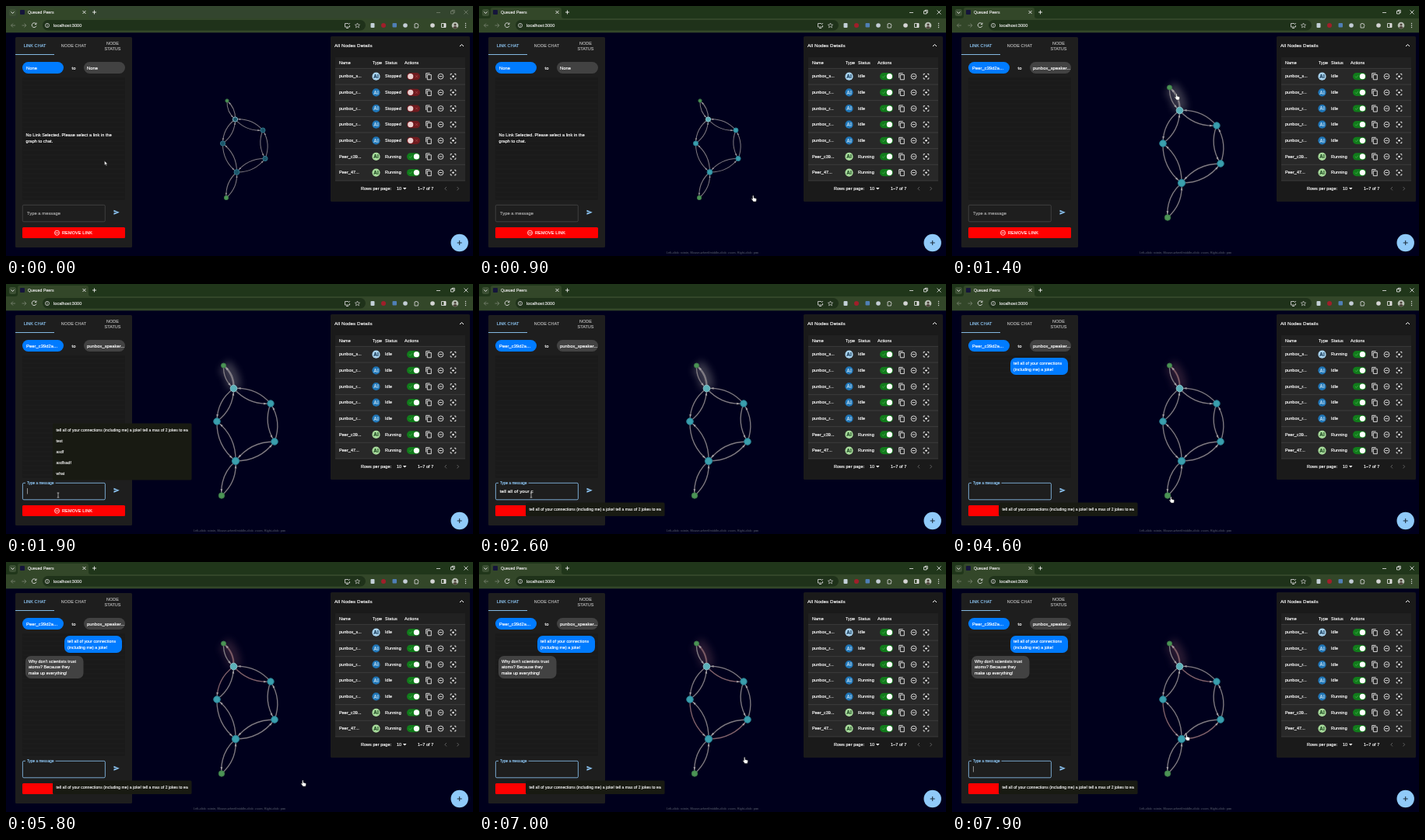
Write an HTML page that moves like this. It is 600x322 px and loops after 8 s.

```html
<!DOCTYPE html>
<html lang="en">
<head>
<meta charset="utf-8">
<title>Agent graph</title>
<style>
html, body { margin: 0; width: 100%; height: 100%; overflow: hidden; background: #00001c; }
svg { display: block; }
text { font-family: "Liberation Sans", Arial, sans-serif; letter-spacing: .06px; white-space: pre; stroke-width: .16px; }
</style>
</head>
<body>
<svg id="stage" width="600" height="322" viewBox="0 0 600 322">
  <defs>
    <filter id="blur" x="-300%" y="-100%" width="700%" height="300%"><feGaussianBlur stdDeviation="5"/></filter>
  </defs>
  <g id="base"></g>
  <g id="live"></g>
</svg>
<script>
const LOOP = 8000, SKY = '#90caf9', BAR = '#334729';
const MESSAGE = 'tell all of your connections (including me) a joke!';
const HISTORY = [MESSAGE + ' tell a max of 2 jokes to each', 'test', 'asdf', 'asdfsadf', 'what'];
const NAMES = ['punbox_s...', 'punbox_r...', 'punbox_r...', 'punbox_r...', 'punbox_r...', 'Peer_c39...', 'Peer_47...'];
const T = { active: 200, on: 500, zoom: 1000, pick: 1400, focus: 1850, type: 1960, send: 3950, run: 4150, reply: 5400, spread: 6800 };

const rect = (x, y, w, h, fill, r = 0, extra = '') =>
  `<rect x="${x}" y="${y}" width="${w}" height="${h}" rx="${r}" fill="${fill}" ${extra}/>`;
const dot = (x, y, r, fill, extra = '') => `<circle cx="${x}" cy="${y}" r="${r}" fill="${fill}" ${extra}/>`;
const line = (d, color = '#eee', w = .9, extra = '') =>
  `<path d="${d}" fill="none" stroke="${color}" stroke-width="${w}" ${extra}/>`;
const shape = (d, fill, extra = '') => `<path d="${d}" fill="${fill}" ${extra}/>`;
const text = (x, y, s, size = 5.47, fill = '#fff', anchor = 'start', extra = '') =>
  `<text x="${x}" y="${y}" font-size="${size}" fill="${fill}" stroke="${fill}" text-anchor="${anchor}" ${extra}>${s}</text>`;
const at = (x, y, s) => `<g transform="translate(${x} ${y})">${s}</g>`;
const clamp = v => Math.max(0, Math.min(1, v));
const ease = v => v * v * (3 - 2 * v);
const mix = (a, b, k) => a + (b - a) * k;
const minusIcon = (x, y, r) => dot(x, y, r, 'none', 'stroke="#fff" stroke-width=".8"') + line(`M${x - 2} ${y}h4`);

const pen = document.createElement('canvas').getContext('2d');
pen.font = '62.5px "Liberation Sans", Arial, sans-serif';
const textWidth = s => pen.measureText(s).width / 10 + s.length * .06;

// The title bar is paler while the window is inactive.
function titleBar(t) {
  const active = t >= T.active;
  return rect(0, 0, 600, 16, active ? '#20361a' : '#33452e') + rect(4, 4, 9, 9, '#3c5034', 2.5) + line('M6.5 7.5l2 2 2-2') +
    shape('M12 16q3 0 3-3V5q0-3 3-3h85q3 0 3 3v8q0 3 3 3z', BAR) + rect(18, 5, 6, 6, '#15153a', 1) +
    text(28, 10, 'Queued Peers', 5.1, '#e6e6e6') + line('M98.5 6l4 4m0-4l-4 4M111 8h5m-2.5-2.5v5') +
    line('M553 8.5h5M571.5 6.5h3.5v3.5h-3.5zM573 6.5v-1.2h3.3v3.5h-1.2M588.5 5.5l5 5m0-5l-5 5', active ? '#eee' : '#76826f', .8);
}

function toolbar() {
  return rect(0, 15.5, 600, 18.8, BAR) + rect(47, 18, 415, 13.5, '#1f321a', 6.7) +
    line('M12 25H6.5m2.5-2.5L6.5 25 9 27.5M20.5 25H26m-2.5-2.5L26 25l-2.5 2.5', '#74806c') +
    line('M38.5 23a2.9 2.9 0 1 0 .4 2.5M39 21.5v2h-2', '#ddd') +
    dot(53, 25, 2.6, 'none', 'stroke="#ccc" stroke-width=".8"') + line('M53 24.7v1.8m0-3.2v.7', '#ccc') +
    text(61, 27, 'localhost:3000', 5.5, '#eee') +
    line('M440 22.5h-4.5v4.5h6v-2M437 28.5h3M440 24l2-2', '#ccc') +
    line('M451.5 22l.9 2 2.2.2-1.7 1.4.6 2.2-2-1.2-2 1.2.6-2.2-1.7-1.4 2.2-.2z', '#ccc', .7) +
    rect(468.5, 22, 5, 6, '#c3d0d8', 1) + dot(485, 25, 3, '#a01f2a') + rect(496.5, 22, 5.5, 5.5, '#4f7fb5', 1) +
    dot(513, 25, 2.8, '#c4cdd6') + line('M525 23h1.3q.7-2 1.5 0h1.5v1.5q2 .7 0 1.5V28H525z', '#ccc') +
    dot(548, 25, 2.8, '#d5d5d5') + line('M559.5 22.5h5.5v5h-5.5z', '#ddd') + rect(562.5, 22.5, 2.5, 5, '#ddd') +
    dot(577, 25, 4.3, '#b9c0b5') + dot(577, 24, 1.5, '#4b4038') + shape('M574 28q3-4 6 0-3 2-6 0z', '#4b4038') +
    [22.5, 25, 27.5].map(y => dot(590.5, y, .7, '#ddd')).join('');
}

function chatPanel() {
  let ruled = '';
  for (let y = 96; y < 250; y += 6) ruled += line(`M21.5 ${y}h131`, '#222', .7);
  return rect(12, 40, 150, 271, '#1e1e1e', 1.5) +
    text(37, 53, 'LINK CHAT', 5.47, SKY, 'middle') + text(87, 53, 'NODE CHAT', 5.47, '#b5b5b5', 'middle') +
    text(137, 49.5, 'NODE', 5.47, '#b5b5b5', 'middle') + text(137, 56.5, 'STATUS', 5.47, '#b5b5b5', 'middle') +
    rect(12, 62, 50, .9, SKY) + rect(21, 92, 132, 158, '#1a1a1a', 1) + ruled +
    rect(21, 72, 53, 15, '#007bff', 7.5) + rect(100, 72, 53, 15, '#424242', 7.5) +
    text(87, 81.5, 'to', 5.8, '#fff', 'middle') +
    shape('M138.5 262.8l7.3 3-7.3 3v-2.3l4.8-.7-4.8-.7z', SKY) +
    rect(21, 285, 132, 14, '#f00', 1.5) + minusIcon(65.5, 292.2, 3) +
    text(72, 294.2, 'REMOVE LINK', 5.47, '#fff', 'start', 'style="letter-spacing:.16px"');
}

const rowY = i => 90.7 + i * 20.65;

function nodesPanel() {
  let s = rect(417, 39, 179, 213, '#1a1a1a', 1.5) + text(422, 53.2, 'All Nodes Details', 6.25) +
    line('M583 52l2.5-2.5 2.5 2.5', '#fff', 1) + rect(423, 66, 167, 159, '#212121', 1) +
    rect(423, 80.4, 167, 144.6, '#282828');
  [[428, 'Name'], [471, 'Type'], [487, 'Status'], [512, 'Actions']].forEach(([x, label]) => s += text(x, 75, label));
  NAMES.forEach((name, i) => {
    const y = rowY(i), user = i > 4;
    s += line(`M423 ${y - 10.3}h167`, '#4a4a4a', .6) + text(428, y + 1.7, name) +
      dot(475.5, y, 5.1, user ? '#a8dc9c' : i ? '#1f76b8' : '#a9d3ee') +
      text(475.5, y + 2.2, 'AI', 6.3, user ? '#204a24' : i ? '#aacfe8' : '#173a58', 'middle', 'font-weight="700"') +
      at(543, y, line('M-1.7-2.2h5v6.3h-5zM-3.3 2v-6h5')) + minusIcon(558.5, y, 3.4) +
      at(574.5, y, line('M-3.3-1.5v-1.8h1.8M1.5-3.3h1.8v1.8M3.3 1.5v1.8H1.5M-1.5 3.3h-1.8V1.5') + dot(0, 0, 1.2, '#fff'));
  });
  return s + line('M423 225h167', '#4a4a4a', .6) + text(456, 237, 'Rows per page:') + text(502, 237, '10') +
    shape('M510 234h4.5l-2.25 2.5z', '#fff') + text(529, 237, '1–7 of 7') +
    line('M566 233l-2.2 2.2 2.2 2.2M579.5 233l2.2 2.2-2.2 2.2', '#666');
}

function status(i, t) {
  if (i > 4) return 'Running';
  if (t < T.on) return 'Stopped';
  const [from, to] = [[T.run, T.reply], [T.reply, T.spread], [T.reply, 7200], [6500, 7500], [T.spread, LOOP]][i];
  return t >= from && t < to ? 'Running' : 'Idle';
}

function toggles(t) {
  return NAMES.map((_, i) => {
    const y = rowY(i), state = status(i, t), off = state === 'Stopped';
    return text(487, y + 1.7, state) + rect(515, y - 4.6, 17, 9.2, off ? '#701a1e' : '#117c1b', 4.6) +
      (off ? line(`M526 ${y - 1.5}l3 3m0-3l-3 3`, '#b04a4e', .7) : line(`M518 ${y}l1.5 1.5 2.5-3`, '#4fb257', .7)) +
      dot(off ? 519.7 : 527.4, y, 3.6, off ? '#ecd0d0' : '#fff');
  }).join('');
}

// Each node: x, y before zooming, x, y after zooming, radius after zooming
const NODES = [[284, 122, 279.5, 105, 3.5], [294.5, 146, 292.5, 134.5, 4.8], [330, 160, 340, 154, 4.7],
  [333, 196.5, 345, 203, 4.8], [296.5, 214, 295, 228, 5.2], [278.5, 177, 271, 177, 4.8], [283, 247, 277, 272.5, 4.2]];
const LINKS = [[0, 1], [1, 2], [2, 3], [3, 4], [4, 5], [5, 1], [4, 6]];

function graph(t) {
  const k = ease(clamp((t - T.zoom) / 350)), scale = mix(.75, 1, k);
  const pts = NODES.map(n => [mix(n[0], n[2], k), mix(n[1], n[3], k), n[4] * scale]);
  const busy = t < T.run ? [] : t < T.reply ? ['1-0'] : t < T.spread ? ['1-0', '1-2', '1-5'] : ['1-0', '5-4', '4-3', '1-2'];
  let s = '';
  const arc = (a, b) => {
    const [x1, y1, r1] = pts[a], [x2, y2, r2] = pts[b], dx = x2 - x1, dy = y2 - y1;
    const cx = (x1 + x2) / 2 - dy * .25, cy = (y1 + y2) / 2 + dx * .25;
    const d = `M${x1} ${y1}Q${cx} ${cy} ${x2} ${y2}`;
    const u = 1 - (r2 + 2 * scale) / Math.hypot(dx, dy), v = 1 - u;
    const px = v * v * x1 + 2 * u * v * cx + u * u * x2, py = v * v * y1 + 2 * u * v * cy + u * u * y2;
    const angle = Math.atan2(v * (cy - y1) + u * (y2 - cy), v * (cx - x1) + u * (x2 - cx)) * 180 / Math.PI;
    if (t >= T.pick && a === 1 && b === 0) {
      const red = t >= T.run;
      s += line(d, red ? '#5e3c50' : '#77747c', 18, `filter="url(#blur)" opacity="${red ? .42 : .48}"`) +
        line(d, red ? '#75505c' : '#aaa6aa', 2.4, 'opacity=".6"');
    }
    s += line(d, busy.includes(a + '-' + b) ? '#80616a' : '#7f7a80', 1.35 * scale) +
      shape('M2.2 0L-1.6-1.4V1.4Z', '#a5a1a5', `transform="translate(${px} ${py}) rotate(${angle}) scale(${scale})"`);
  };
  LINKS.forEach(([a, b]) => {
    arc(b, a);
    arc(a, b);
  });
  pts.forEach(([x, y, r], i) => {
    const user = i === 0 || i === 6, stopped = t < T.on;
    const fill = user ? '#4c9455' : stopped ? '#1b566a' : i === 1 ? '#5bb0b9' : '#3a9fad';
    const ring = user ? '#3c7c48' : stopped ? (i === 1 ? '#86b7c4' : '#30758a') : i === 1 ? '#8cc3c8' : '#267b8f';
    s += dot(x, y, r - .5, fill, `stroke="${ring}" stroke-width="1"`);
  });
  return s;
}

function chat(t) {
  const picked = t >= T.pick;
  let s = text(26, 81.5, picked ? 'Peer_c39d2a...' : 'None', 5.8) +
    text(104, 81.5, picked ? 'punbox_speaker...' : 'None', 5.8);
  if (!picked) s += text(25.5, 168.2, 'No Link Selected. Please select a link in the', 5.55) + text(25.5, 176, 'graph to chat.', 5.55);
  if (t >= T.send) {
    s += rect(75, 95, 74, 22, '#007bff', 7) + text(79, 104, 'tell all of your connections', 5.25) + text(79, 111.5, '(including me) a joke!', 5.25);
  }
  if (t >= T.reply) {
    s += rect(25, 121, 74.5, 29, '#424242', 7);
    ["Why don't scientists trust", 'atoms? Because they', 'make up everything!'].forEach((l, i) => s += text(29, 130 + i * 7.4, l, 5.4));
  }
  return s;
}

function entry(t) {
  if (t < T.focus) return rect(21.3, 256.3, 106, 21.5, 'none', 1.5, 'stroke="#555" stroke-width=".6"') +
    text(27, 269, 'Type a message', 5.75, '#aaa');
  const count = t < T.send ? Math.max(0, Math.min(MESSAGE.length, Math.floor((t - T.type) / 34.8))) : 0;
  const typed = MESSAGE.slice(0, count), end = Math.min(textWidth(typed), 95);
  let s = rect(21.4, 256.3, 106, 21.5, 'none', 1.5, `stroke="${SKY}" stroke-width=".8"`) +
    rect(25, 255, 38.5, 3, '#1e1e1e') + text(27, 258, 'Type a message', 4.6, SKY) +
    `<svg x="26" y="258" width="97" height="18">${text(end < 95 ? .8 : 96, 11.2, typed, 6.25, '#fff', end < 95 ? 'start' : 'end')}</svg>`;
  if ((t + 100) % 400 < 200) s += rect(27 + end, 263, .6, 7.5, '#ddd');

  const matches = count ? HISTORY.filter(h => h.startsWith(typed.slice(0, 3))) : HISTORY;
  const list = t < T.send ? matches : HISTORY.slice(0, 1);
  const full = list.length === HISTORY.length, top = full ? 179.5 : 281.5;
  const height = full ? 73 : list.length * 14 + 3.5;
  s += rect(60, top, 178.5, height, '#181a12', 1.5) + `<svg x="60" y="${top}" width="174" height="${height}">`;
  list.forEach((item, i) => s += text(4.5, 10.3 + i * 14, item, 5, '#eee'));
  return s + '</svg>';
}

const PATH = [[0, 127, 200], [100, 127, 200], [800, 353, 246], [1000, 353, 246], [1300, 289, 115], [1450, 289, 115],
  [1800, 67, 272], [3950, 67, 272], [4400, 282, 276], [4800, 282, 276], [5500, 382, 283], [6400, 382, 283], [7600, 302, 224], [LOOP, 302, 224]];

function cursor(t) {
  const i = PATH.findIndex(p => p[0] > t), a = PATH[i - 1], b = PATH[i];
  const k = ease((t - a[0]) / (b[0] - a[0])), x = mix(a[1], b[1], k), y = mix(a[2], b[2], k);
  const edge = 'stroke="#222" stroke-width=".5"';
  if (x > 162 && x < 417) return at(x, y,
    shape('M-1.5-1.5q.8-1.2 1.5 0V1l3 .9q.8.3.6 1.2L3 6H-.5L-3 2.5q.4-1.1 1.5 0z', '#fff', edge));
  if (x > 21 && x < 127 && y > 256) return at(x, y, line('M-1.3-3h2.6M0-3v6M-1.3 3h2.6', '#ddd', .7));
  return at(x, y, shape('M-.5-.5v5.5l1.3-1.2.9 2 .9-.4-.9-1.9h1.8z', '#fff', edge));
}

const base = document.getElementById('base'), live = document.getElementById('live');
base.innerHTML = rect(0, 0, 600, 322, '#00001c') + toolbar() + chatPanel() + nodesPanel() +
  dot(582.7, 305, 11.2, SKY) + line('M579.7 305h6m-3-3v6', '#1a2a38', 1);

function draw() {
  const t = performance.now() % LOOP;
  const hint = t < 300 ? '' : text(300, 319, 'Left-click: rotate, Mouse-wheel/middle-click: zoom, Right-click: pan', 3.9, '#3e4254', 'middle');
  live.innerHTML = titleBar(t) + graph(t) + hint + toggles(t) + chat(t) + entry(t) + cursor(t);
  requestAnimationFrame(draw);
}
draw();
</script>
</body>
</html>
```
